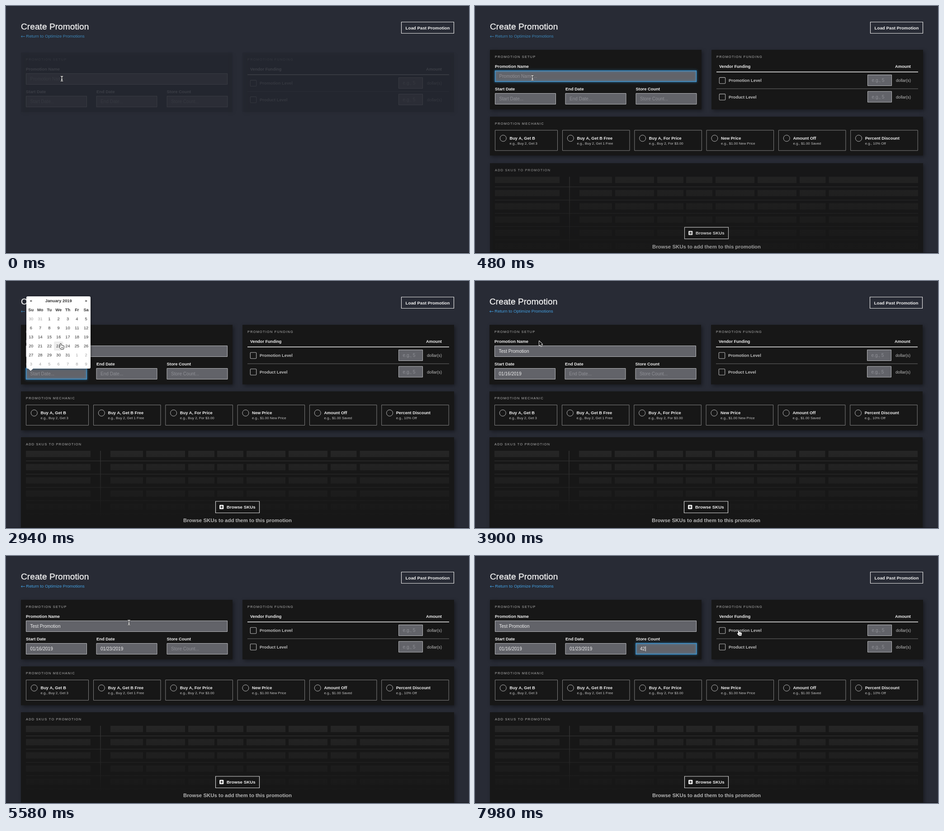
Animation, 1024 px wide and 547 px high, one loop 8000 ms. Source, as an HTML page with a canvas:

```html
<!DOCTYPE html>
<html lang="en">
<head>
<meta charset="utf-8">
<title>Create Promotion</title>
<style>
  html, body { margin: 0; width: 100%; height: 100%; overflow: hidden; background: #282b35; }
  canvas { display: block; }
</style>
</head>
<body>
<canvas id="stage" width="1024" height="547"></canvas>
<script>
const ctx = document.getElementById('stage').getContext('2d');
const LOOP = 8000;
const PANEL = '#171717';
const FONT = '"Liberation Sans", Arial, sans-serif';

// Times of the interactions, in ms
const FOCUS_NAME = 300, TYPE_NAME = 900, OPEN_START = 2430, PICK_START = 3270;
const OPEN_END = 4230, PICK_END = 5470, FOCUS_COUNT = 6300, TYPE_4 = 6700, TYPE_2 = 6900;
const NAME = 'Test Promotion', KEY_TIME = 86;
const NAME_DONE = TYPE_NAME + KEY_TIME * (NAME.length - 1);

const clamp = v => Math.max(0, Math.min(1, v));
const smooth = v => v * v * (3 - 2 * v);
const between = (t, a, b) => t >= a && t < b;

// CSS "ease": cubic-bezier(.25, .1, .25, 1)
function ease(x) {
  const bezier = (a, b, s) => 3 * a * s * (1 - s) ** 2 + 3 * b * s * s * (1 - s) + s ** 3;
  let low = 0, high = 1;
  for (let i = 0; i < 16; i++) {
    const mid = (low + high) / 2;
    if (bezier(.25, .25, mid) < x) low = mid; else high = mid;
  }
  return bezier(.1, 1, low);
}

// Text is placed by the vertical middle of its capitals
function text(str, x, middle, size, color, { bold, align = 'left', spacing = 0 } = {}) {
  ctx.font = `${bold ? 'bold ' : ''}${size}px ${FONT}`;
  ctx.letterSpacing = spacing + 'px';
  ctx.textAlign = align;
  ctx.fillStyle = color;
  ctx.fillText(str, x, middle + size * .36);
}

const heading = (str, x, y) => text(str, x, y, 7.3, '#b4b4b4', { spacing: 1.28 });
const label = (str, x, y, size = 9.4, color = '#f0f0f0') => text(str, x, y, size, color, { bold: true });

function rect(x, y, w, h, fill) {
  ctx.fillStyle = fill;
  ctx.fillRect(x, y, w, h);
}

function outline(x, y, w, h, color, width = 1, radius = 0) {
  ctx.strokeStyle = color;
  ctx.lineWidth = width;
  ctx.beginPath();
  ctx.roundRect(x, y, w, h, radius);
  ctx.stroke();
}

function shadow(color, blur, offset, draw) {
  ctx.save();
  Object.assign(ctx, { shadowColor: color, shadowBlur: blur, shadowOffsetX: offset, shadowOffsetY: offset });
  draw();
  ctx.restore();
}

const panel = (x, y, w, h) => shadow('rgba(0,0,0,.4)', 8, 3, () => rect(x, y, w, h, PANEL));

function field(x, y, w, value, placeholder, { focused, caret, h = 24 } = {}) {
  rect(x, y, w, h, '#626369');
  if (focused) {
    shadow('#3d9fe0', 5, 0, () => outline(x, y, w, h, '#3d98d6', 1.4));
  } else {
    outline(x, y, w, h, '#b9babd');
  }
  text(value || placeholder, x + 9, y + h / 2, 10.05, value ? '#f0f0f0' : '#8f9096');
  if (caret) rect(x + 9.5 + ctx.measureText(value).width, y + 6.5, 1, 11, '#fff');
}

// Panels rise and fade in one after another
function reveal(t, start, draw) {
  const p = ease(clamp((t - start) / 600));
  ctx.save();
  ctx.globalAlpha = Math.min(1, 1.25 * p);
  ctx.translate(0, 6.7 * (1 - p));
  draw();
  ctx.restore();
}

function drawHeader(t) {
  ctx.strokeStyle = '#f2f2f2';
  text('Create Promotion', 33, 45, 19.2, '#f2f2f2');
  ctx.lineWidth = .35;
  ctx.strokeText('Create Promotion', 33, 45 + 19.2 * .36);
  const blue = t < PICK_START ? '#3b86b9' : '#42a0e2';
  text('Return to Optimize Promotions', 44.3, 67, 9.47, blue);
  ctx.strokeStyle = blue;
  ctx.lineWidth = .9;
  ctx.beginPath();
  ctx.moveTo(42, 67.5); ctx.lineTo(33.5, 67.5);
  ctx.moveTo(36, 65.3); ctx.lineTo(33.5, 67.5); ctx.lineTo(36, 69.7);
  ctx.stroke();
  outline(874.5, 35.5, 116, 25, '#e6e6e6', 1.2);
  text('Load Past Promotion', 932.5, 48, 9.75, '#f2f2f2', { bold: true, align: 'center' });
}

function drawSetup(t) {
  panel(33, 97, 468, 132);
  heading('PROMOTION SETUP', 44, 112);
  label('Promotion Name', 44, 133.5);
  const typed = t < TYPE_NAME ? '' : NAME.slice(0, Math.floor((t - TYPE_NAME) / KEY_TIME) + 1);
  const blink = since => Math.max(0, t - since) % 1080 < 540;
  const nameFocused = between(t, FOCUS_NAME, OPEN_START);
  field(44.5, 143.5, 445, typed, 'Promotion Name...',
    { focused: nameFocused, caret: nameFocused && typed && blink(NAME_DONE) });
  label('Start Date', 44, 183.5);
  label('End Date', 200, 183.5);
  label('Store Count', 355.5, 183.5);
  field(44.5, 193.5, 134, t < PICK_START ? '' : '01/16/2019', 'Start Date...',
    { focused: between(t, OPEN_START, PICK_START) });
  field(200, 193.5, 134, t < PICK_END ? '' : '01/23/2019', 'End Date...',
    { focused: between(t, OPEN_END, PICK_END) });
  const count = t < TYPE_4 ? '' : t < TYPE_2 ? '4' : '42';
  field(356, 193.5, 134, count, 'Store Count...',
    { focused: t >= FOCUS_COUNT, caret: count && blink(TYPE_2) });
}

function drawFunding() {
  panel(523, 97, 468, 132);
  heading('PROMOTION FUNDING', 534, 112);
  label('Vendor Funding', 540, 133.5, 9.15);
  label('Amount', 929, 133.5, 9.25);
  rect(534, 145.3, 446, 1.5, '#f0f0f0');
  rect(534, 182.7, 446, 1, '#6c6c6c');
  ['Promotion Level', 'Product Level'].forEach((name, i) => {
    const y = 165 + i * 36.5;
    outline(540.3, y - 6.7, 13.4, 13.4, '#b9b9b9', 1.1, 1.5);
    label(name, 561, y, 9.3, '#bdbdbd');
    field(868.5, y - 12.5, 53, '', 'e.g., 5');
    text('dollar(s)', 931, y, 9.15, '#bdbdbd');
  });
}

const MECHANICS = [
  ['Buy A, Get B', 'Buy 2, Get 3'], ['Buy A, Get B Free', 'Buy 2, Get 1 Free'],
  ['Buy A, For Price', 'Buy 2, For $3.00'], ['New Price', '$1.00 New Price'],
  ['Amount Off', '$1.00 Saved'], ['Percent Discount', '10% Off']
];

function drawMechanics() {
  panel(33, 244.5, 958, 86);
  heading('PROMOTION MECHANIC', 44, 259.5);
  MECHANICS.forEach(([name, example], i) => {
    const x = i ? 193.5 + (i - 1) * 159.3 : 44.5;
    outline(x, 274.5, i ? 148.5 : 138, 45, '#808080');
    ctx.strokeStyle = '#b9b9b9';
    ctx.beginPath();
    ctx.arc(x + 17.8, 292.3, 7, 0, 7);
    ctx.stroke();
    label(name, x + 32, 292, 9.25);
    text('e.g., ' + example, x + 32, 303.2, 7.9, '#c2c2c2');
  });
}

const BARS = [[44, 187], [231, 303], [310, 396], [403, 461], [467, 525], [532, 618], [625, 711], [718, 775.5], [782.5, 980]];

function drawSkus() {
  panel(33, 346, 958, 215);
  heading('ADD SKUS TO PROMOTION', 44, 361.3);
  for (let row = 0; row < 6; row++) {
    const y = 376 + row * 29.3;
    for (const [left, right] of BARS) rect(left, y, right - left, 14, '#252525');
    rect(44, y + 22, 936, 1, '#383838');
  }
  rect(208.3, 376, 1.4, 185, '#383838');
  const fade = ctx.createLinearGradient(0, 380, 0, 525);
  fade.addColorStop(0, 'rgba(23,23,23,0)');
  fade.addColorStop(1, PANEL);
  rect(40, 376, 945, 185, fade);
  rect(463.5, 488, 97, 25.5, PANEL);
  outline(463.5, 488, 97, 25.5, '#d8d8d8', 1.2);
  ctx.fillStyle = '#f0f0f0';
  ctx.beginPath();
  ctx.roundRect(472, 495.8, 9.4, 9.4, 1.5);
  ctx.fill();
  rect(474, 499.8, 5.4, 1.4, PANEL);
  rect(476, 497.8, 1.4, 5.4, PANEL);
  label('Browse SKUs', 488, 500.5, 9.7);
  text('Browse SKUs to add them to this promotion', 512, 530.3, 11.45, '#b4b4b4', { bold: true, align: 'center' });
}

function drawCalendar(x, age, pointer) {
  ctx.save();
  ctx.globalAlpha = clamp(age / 100);
  ctx.translate(x, 34);
  ctx.fillStyle = '#fff';
  shadow('rgba(0,0,0,.45)', 5, 1, () => {
    ctx.beginPath();
    ctx.roundRect(0, 0, 142, 160, 3);
    ctx.fill();
  });
  ctx.beginPath();
  ctx.moveTo(4, 160); ctx.lineTo(9.5, 165); ctx.lineTo(15, 160);
  ctx.fill();
  const put = (str, column, y, color, bold) =>
    text(str, 10.3 + column * 20.3, y, 9.3, color, { bold, align: 'center' });
  put('«', 0, 10, '#333', true);
  put('January 2019', 3, 10, '#333', true);
  put('»', 6, 10, '#333', true);
  ['Su', 'Mo', 'Tu', 'We', 'Th', 'Fr', 'Sa'].forEach((day, i) => put(day, i, 30, '#333', true));
  const overColumn = Math.floor((pointer.x - x) / 20.3);
  const overRow = Math.floor((pointer.y - 74) / 20);
  for (let i = 0; i < 42; i++) {
    const column = i % 7, row = Math.floor(i / 7);
    if (column === overColumn && row === overRow) {
      ctx.fillStyle = '#ececec';
      ctx.beginPath();
      ctx.roundRect(column * 20.3 + .2, 40 + row * 20, 20.3, 20, 2);
      ctx.fill();
    }
    const outside = i < 2 || i > 32;
    put(i < 2 ? 30 + i : i > 32 ? i - 32 : i - 1, column, 49.7 + row * 20, outside ? '#a2a2a2' : '#333');
  }
  ctx.restore();
}

// Pointer stops: time, x, y
const STOPS = [
  [0, 123.5, 161], [480, 127, 159], [2060, 127, 159], [2400, 110, 206], [2580, 110, 206],
  [2940, 121, 139], [3120, 117, 122], [3480, 117, 122], [3900, 142, 133], [4220, 255, 205],
  [4900, 255, 205], [5280, 272, 147.5], [5700, 272, 147.5], [6180, 385, 207], [7140, 385, 207],
  [7900, 583, 165], [LOOP, 583, 165]
];

function pointerAt(t) {
  const next = Math.max(1, STOPS.findIndex(stop => stop[0] > t));
  const [t0, x0, y0] = STOPS[next - 1], [t1, x1, y1] = STOPS[next];
  const p = smooth((t - t0) / (t1 - t0));
  return { x: x0 + (x1 - x0) * p, y: y0 + (y1 - y0) * p };
}

const SHAPES = {
  arrow: new Path2D('M0 0V10.2L2.4 8L4 11.6L5.8 10.8L4.2 7.3H7.3Z'),
  hand: new Path2D('M-1 .8C-1-.4 .8-.4 .9 .8L1.3 4C2.3 3.2 3.2 3.6 3.5 4.4C4.4 3.8 5.3 4.2 5.6 5.1C6.8 4.6 7.3 5.6 7 7L6.2 11.5H.6L-2.6 7.4C-3.4 6.2-2 5.4-1 6.5Z'),
  beam: new Path2D('M-2.6-5.3Q-.4-5.3 0-4.3Q.4-5.3 2.6-5.3M0-4.3V4.3M-2.6 5.3Q-.4 5.3 0 4.3Q.4 5.3 2.6 5.3M-1.5 1.6H1.5')
};

function drawPointer({ x, y }, calendarX) {
  const overCalendar = calendarX && x > calendarX && x < calendarX + 142 && y > 34 && y < 194;
  const overField = x > 44 && x < 490 && (between(y, 143, 168) || between(y, 193, 218));
  const overOption = x > 540 && x < 640 && y < 178;
  const kind = overCalendar || overOption ? 'hand' : overField ? 'beam' : 'arrow';
  ctx.save();
  ctx.translate(x, y);
  ctx.lineJoin = 'round';
  const stroke = (color, width) => {
    ctx.strokeStyle = color;
    ctx.lineWidth = width;
    ctx.stroke(SHAPES[kind]);
  };
  if (kind === 'beam') {
    stroke('#222', 2.8);
    stroke('#fff', 1.2);
  } else {
    stroke(kind === 'arrow' ? '#fff' : '#222', 1.8);
    ctx.fillStyle = kind === 'arrow' ? '#111' : '#fff';
    ctx.fill(SHAPES[kind]);
    if (kind === 'hand') {
      ctx.strokeStyle = '#222';
      ctx.lineWidth = .7;
      ctx.beginPath();
      for (const line of [1.6, 3.2, 4.8]) { ctx.moveTo(line, 7); ctx.lineTo(line, 9.5); }
      ctx.stroke();
    }
  }
  ctx.restore();
}

function draw(t) {
  rect(0, 0, 1024, 547, '#282b35');
  rect(0, 0, 1024, 1, '#20232b');
  const pointer = pointerAt(t);
  const opened = between(t, OPEN_START, PICK_START) ? OPEN_START : between(t, OPEN_END, PICK_END) ? OPEN_END : 0;
  const calendarX = opened && (opened === OPEN_START ? 45 : 200.5);
  ctx.save();
  if (between(t, PICK_START, OPEN_END)) ctx.translate(-1, 0);
  drawHeader(t);
  reveal(t, -60, () => { drawSetup(t); drawFunding(); });
  reveal(t, 100, drawMechanics);
  reveal(t, 240, drawSkus);
  if (opened) drawCalendar(calendarX, t - opened, pointer);
  ctx.restore();
  rect(0, 546, 1024, 1, '#15161a');
  const typing = between(t, TYPE_NAME, 2060) || between(t, TYPE_4, 7140);
  if (!typing) drawPointer(pointer, calendarX);
}

const begin = performance.now();
function tick() {
  draw((performance.now() - begin) % LOOP);
  requestAnimationFrame(tick);
}
tick();
</script>
</body>
</html>
```
